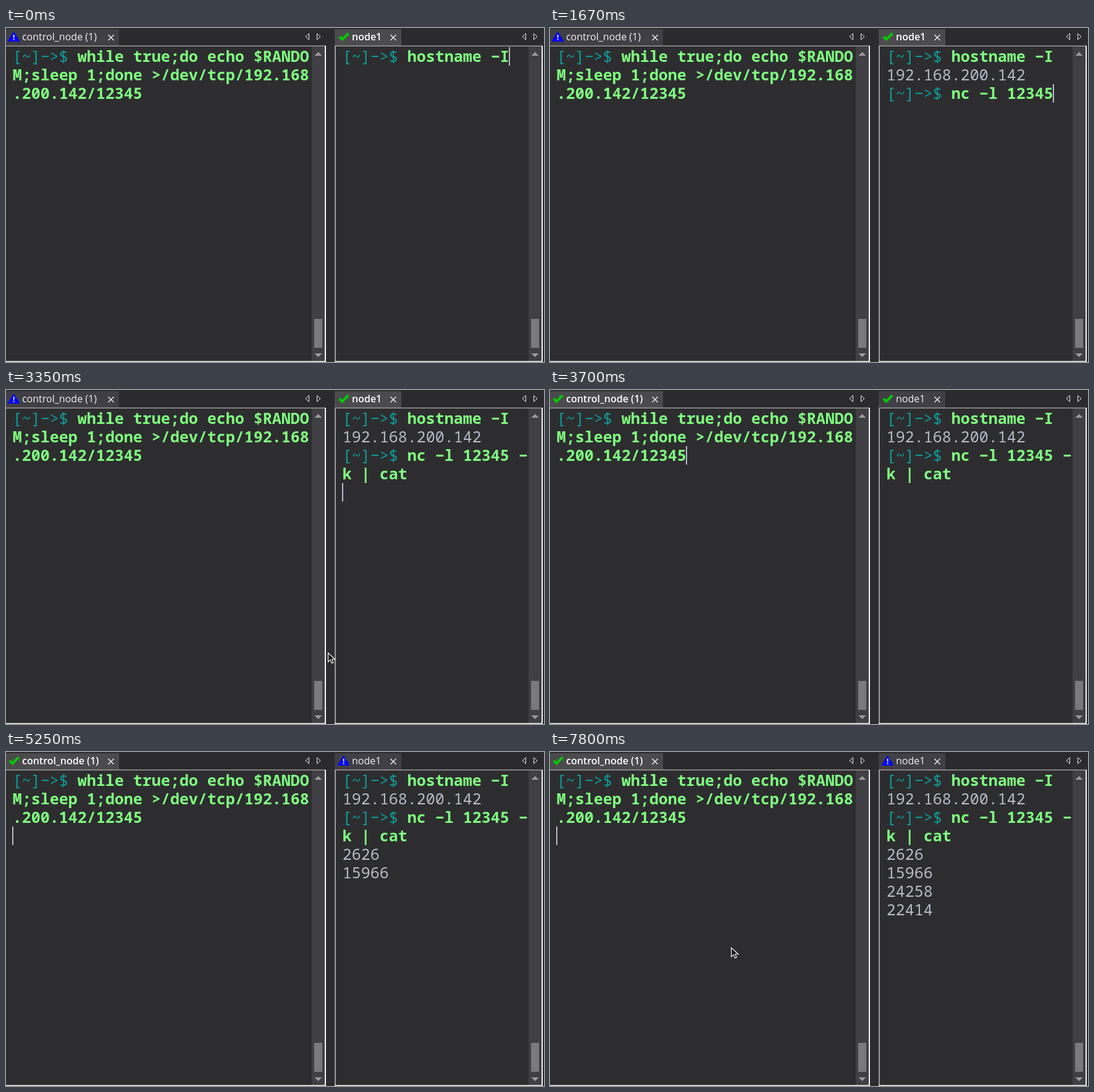
Animation of 871 by 542 pixels, one loop 8 s. Source, as an HTML page:

```html
<!DOCTYPE html>
<html lang="en">
<head>
<meta charset="utf-8">
<title>Two terminals</title>
<style>
  html, body { margin: 0; width: 100%; height: 100%; overflow: hidden; background: #2d2d2f; }
  svg { display: block; width: 871px; height: 542px; }
  text { white-space: pre; }
  .term { font: 500 25px "Noto Sans Mono", "DejaVu Sans Mono", monospace; fill: #b4bbc8; }
  .term .prompt { fill: #0f9b9b; }
  .term .command { fill: #80ff80; font-weight: 700; }
  .tab { font: 16px "Open Sans", "Noto Sans", sans-serif; fill: #f0f0f0; }
  .tab rect { fill: #403f46; }
  .tab .focus rect { fill: #4b4b4d; }
  .tab .focus text { font-weight: 600; fill: #fff; }
  .line { fill: none; stroke: #e8e8e8; }
  .track { fill: #403f44; }
  .thumb { fill: #7b7a7b; }
  .arrow { fill: #9c9c9c; }
  .dark { fill: #9a9a9a; }
  .light { fill: #f4f4f4; }
  #caret { fill: #b4bbc8; }
</style>
</head>
<body>
<svg viewBox="0 0 871 542">
  <defs>
    <path id="check" d="M6 14.2L10.4 18.6L20.3 8.6" fill="none" stroke="#0c0" stroke-width="4"/>
    <g id="alert">
      <path d="M12.5 6.5L21.8 21.5H3.2Z" fill="#00f" stroke="#00f" stroke-linejoin="round"/>
      <path d="M11.5 11h2.2l-.5 5.5h-1.2ZM11.6 17.7h2v2h-2Z" fill="#fff"/>
    </g>
    <path id="close" class="line" stroke-width="1.5" d="M-4.5 -4.5L4.5 4.5M4.5 -4.5L-4.5 4.5"/>
    <path id="nav" class="line" d="M6.5 9V19L1 14ZM19.5 9V19L25 14Z"/>
    <path id="up" class="arrow" d="M-6 3H6L0 -3Z"/>
    <path id="down" class="arrow" d="M-6 -3H6L0 3Z"/>
  </defs>
  <rect width="871" height="542" fill="#2d2d2f"/>
  <rect width="871" height="29" fill="#2b2b2d"/>
  <g id="panes"></g>
  <rect id="caret" width="2" height="30"/>
  <path id="pointer" d="M.5 .8V15.2L4.1 11.9L6.4 17.3L9.1 16.1L6.8 11H11.8Z" fill="#1c1c1e" stroke="#fff" stroke-width="1.1"/>
</svg>
<script>
  const LOOP = 8000, STEP = 75;
  const CELL = 15, ROW = 30;
  const FOCUS = 3560, CONNECT = 4250;

  const left = { x: -2, width: 520, tab: 185, cols: 32, name: "control_node (1)", alert: [0, FOCUS], focus: [FOCUS, LOOP] };
  const right = { x: 532, width: 337, tab: 108, cols: 20, name: "node1", alert: [CONNECT, LOOP], focus: [0, FOCUS] };

  const byId = id => document.getElementById(id);
  const within = (t, [from, to]) => t >= from && t < to;
  const during = ([from, to]) => `data-on="${from} ${to}"`;
  const outside = ([from, to]) => during(from ? [0, from] : [to, LOOP]);

  function paneMarkup({ width, tab, name, alert, focus }) {
    const edge = width - 2;
    const label = `<rect y="2" width="${tab}" height="27"/><text x="28" y="20">${name}</text>`;
    return `
      <g class="tab">
        <g ${outside(focus)}>${label}</g>
        <g class="focus" ${during(focus)}>${label}</g>
        <use href="#alert" x="2" ${during(alert)}/>
        <use href="#check" x="2" ${outside(alert)}/>
        <use href="#close" x="${tab - 13}" y="15.5"/>
        <use href="#nav" x="${edge - 32}"/>
      </g>
      <rect class="track" x="${edge - 21}" y="30" width="21" height="511"/>
      <rect class="thumb" x="${edge - 17}" y="472" width="13" height="47"/>
      <use href="#up" x="${edge - 10.5}" y="42"/>
      <use href="#down" x="${edge - 10.5}" y="531"/>
      <rect class="dark" y="28.5" width="${width}" height="1.5"/>
      <rect class="dark" y="29" width="2" height="513"/>
      <rect class="light" x="${edge}" y="29" width="2" height="513"/>
      <rect class="light" y="540.5" width="${width}" height="1.5"/>
      <g class="term" transform="translate(12.7 55)"></g>`;
  }

  function svg(tag, attrs, parent) {
    const el = document.createElementNS("http://www.w3.org/2000/svg", tag);
    for (const key in attrs) el.setAttribute(key, attrs[key]);
    return parent.appendChild(el);
  }

  for (const pane of [left, right]) {
    const group = svg("g", { transform: `translate(${pane.x} 0)` }, byId("panes"));
    group.innerHTML = paneMarkup(pane);
    Object.assign(pane, { screen: group.querySelector(".term"), col: 0, row: 0, marks: [] });
  }

  // Writes text at a time, wrapping at the pane's width, and notes where the caret ends up.
  function print(pane, at, kind, text) {
    while (text) {
      const part = text.slice(0, pane.cols - pane.col);
      const el = svg("text", { class: kind, x: pane.col * CELL, y: pane.row * ROW, "data-on": `${at} ${LOOP}` }, pane.screen);
      el.textContent = part.replaceAll("-", "\u2212");
      text = text.slice(part.length);
      pane.col += part.length;
      if (text) newline(pane, at);
    }
    mark(pane, at);
  }

  function newline(pane, at) {
    pane.col = 0;
    pane.row++;
    mark(pane, at);
  }

  function mark(pane, at) {
    pane.marks.push({ at, x: pane.x + 12 + pane.col * CELL, y: 31 + pane.row * ROW });
  }

  function prompt(pane, at) {
    print(pane, at, "prompt", "[~]->$ ");
  }

  prompt(left, 0);
  print(left, 0, "command", "while true;do echo $RANDOM;sleep 1;done >/dev/tcp/192.168.200.142/12345");
  newline(left, CONNECT);

  prompt(right, 0);
  print(right, 0, "command", "hostname -I");
  newline(right, 140);
  print(right, 140, "output", "192.168.200.142");
  newline(right, 140);
  prompt(right, 140);
  print(right, 1670, "command", "nc -l 12345");
  print(right, 1890, "command", " -k | cat");
  newline(right, 2820);
  ["2626", "15966", "24258", "22414"].forEach((number, i) => {
    print(right, CONNECT + i * 1000, "output", number);
    newline(right, CONNECT + i * 1000);
  });

  // Pointer strokes: a quadratic curve from a to b, bent towards c, then a rest until it hides.
  const strokes = [
    { on: [850, 1670], end: 1300, a: [400, 499], c: [184, 336], b: [722, 358] },
    { on: [2430, 2510], end: 2510, a: [766, 366], c: [766, 366], b: [766, 366] },
    { on: [3200, 3700], end: 3650, a: [590, 390], c: [470, 440], b: [450, 513] },
    { on: [7650, LOOP], end: 7800, a: [450, 528], c: [365, 415], b: [293, 317] }
  ];

  function strokePoint({ on, end, a, b, c }, t) {
    const passed = Math.floor((t - on[0]) / STEP) * STEP;
    const p = Math.min(1, passed / (end - on[0])), q = 1 - p;
    return [0, 1].map(i => Math.round(q * q * a[i] + 2 * p * q * c[i] + p * p * b[i]));
  }

  const timed = [...document.querySelectorAll("[data-on]")].map(el => ({ el, on: el.dataset.on.split(" ").map(Number) }));

  function show(el, visible) {
    el.style.visibility = visible ? "visible" : "hidden";
  }

  function move(el, x, y) {
    el.setAttribute("transform", `translate(${x} ${y})`);
  }

  function draw(now) {
    const t = now % LOOP;
    for (const { el, on } of timed) show(el, within(t, on));

    const active = within(t, left.focus) ? left : right;
    const { x, y } = active.marks.findLast(m => m.at <= t);
    move(byId("caret"), x, y);

    const stroke = strokes.find(s => within(t, s.on));
    show(byId("pointer"), stroke);
    if (stroke) move(byId("pointer"), ...strokePoint(stroke, t));
  }

  let start;
  function tick(now) {
    start ??= now;
    draw(now - start);
    requestAnimationFrame(tick);
  }
  draw(0);
  requestAnimationFrame(tick);
</script>
</body>
</html>
```
